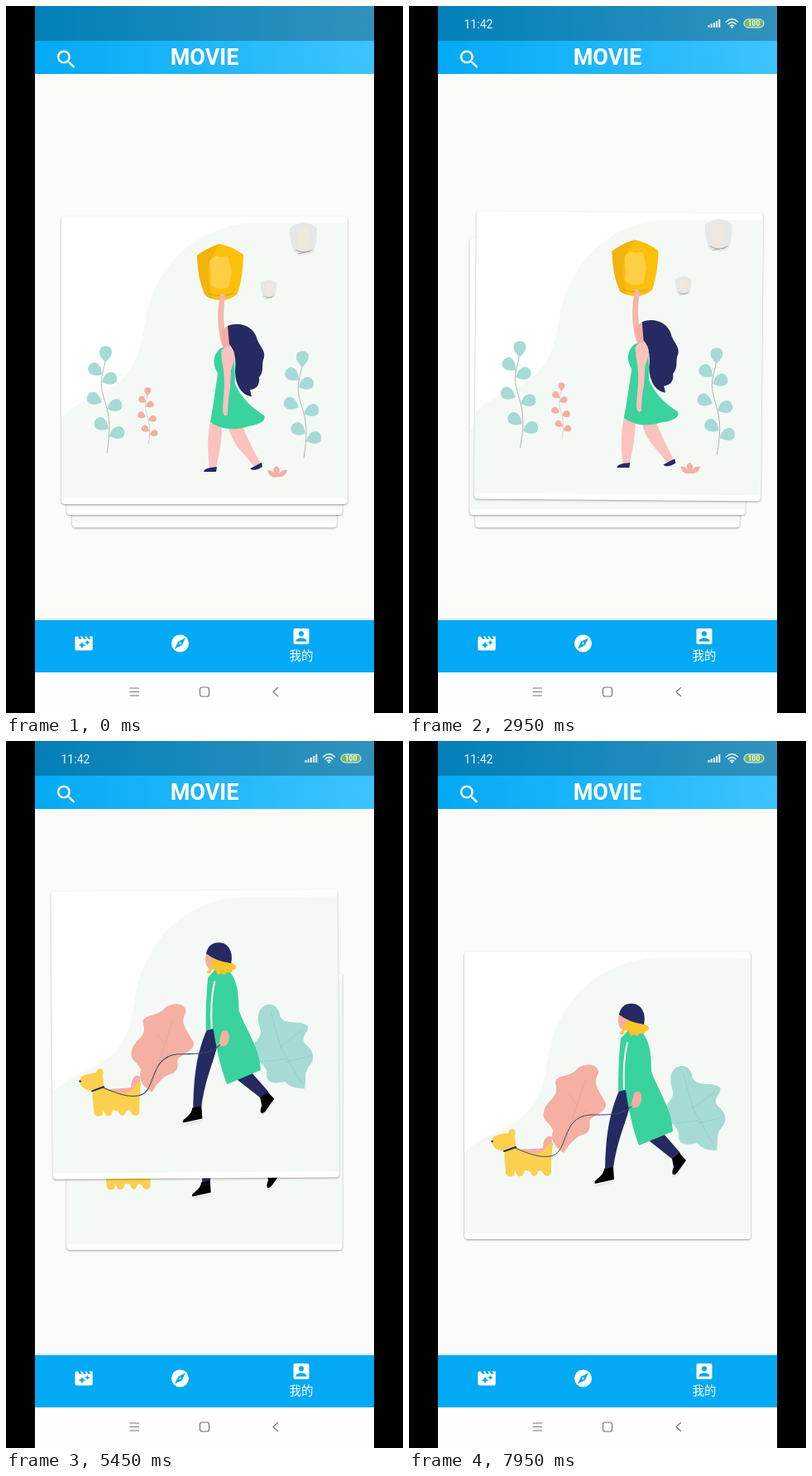
An HTML page that plays this animation: 480 by 853 pixels, repeating every 8000 ms.

```html
<!DOCTYPE html>
<html lang="zh">
<head>
<meta charset="utf-8">
<title>Card stack</title>
<style>
html, body { margin: 0; width: 100%; height: 100%; overflow: hidden; background: #000; }
svg { display: block; width: 480px; height: 853px; }
.paper { fill: #fff; filter: drop-shadow(0 1px 1.1px rgba(0, 0, 0, .38)); }
.teal { fill: #a5dbd4; }
.coral { fill: #f5afa3; }
.skin { fill: #fcc2bd; }
.navy { fill: #252a62; }
.green { fill: #3ad39d; }
.gold { fill: #fcc52a; }
.line { fill: none; stroke-linecap: round; stroke-linejoin: round; }
.white { fill: #fff; }
</style>
</head>
<body>
<svg viewBox="0 0 480 853">
<defs>
  <linearGradient id="statusFill"><stop stop-color="#0280b8"/><stop offset="1" stop-color="#3292be"/></linearGradient>
  <linearGradient id="barFill"><stop stop-color="#03a9f4"/><stop offset="1" stop-color="#3dc4ff"/></linearGradient>
  <clipPath id="content"><rect x="35" y="82" width="410" height="659"/></clipPath>

  <g id="paper">
    <rect class="paper" x="67" y="254" width="346" height="347" rx="4"/>
    <path fill="#f5f9f6" d="M413 262H297C228 265 181 315 169 375C165 400 162 424 146 444C124 471 86 474 67 497V594H413Z"/>
  </g>

  <path id="leaf" d="M0 0C-5 -4 -9 -9 -7 -15C-5 -20 4 -21 7 -15C9 -9 4 -4 0 0Z"/>
  <g id="sprig">
    <path class="line" stroke="#b5b5b5" stroke-width="1" d="M120 428C117 446 112 452 118 472C124 490 128 504 122 539"/>
    <use href="#leaf" transform="translate(120.500 429.500)"/>
    <use href="#leaf" transform="translate(116 445) rotate(-52)"/>
    <use href="#leaf" transform="translate(116 454) rotate(66)"/>
    <use href="#leaf" transform="translate(116 478) rotate(-66)"/>
    <use href="#leaf" transform="translate(122 486) rotate(68)"/>
    <use href="#leaf" transform="translate(124 510) rotate(-58)"/>
    <use href="#leaf" transform="translate(125 519) rotate(68)"/>
  </g>
  <g id="paleLantern">
    <path fill="#e4e8e9" d="M343 268Q351 262 360 261Q370 262 376 268Q376 285 372 297Q361 303 348 297Q343 283 343 268Z"/>
    <path fill="#efe8dc" d="M352 269Q360 264 368 270L366 293L353 293Z"/>
    <path class="line" stroke="#a99f9c" d="M350 294Q360 300 370 294M353 299L367 296"/>
  </g>

  <g id="lanternCard">
    <use href="#paper"/>
    <use href="#sprig" class="teal"/>
    <use href="#sprig" class="teal" transform="translate(238 6)"/>
    <use href="#sprig" class="coral" transform="translate(107.500 242.500) scale(.53)"/>
    <use href="#paleLantern"/>
    <use href="#paleLantern" transform="translate(104.200 175.500) scale(.593)"/>
    <path class="gold" style="fill:#fcc00b" d="M231 301Q243 292 258 287Q274 290 287 300Q287 325 280 347Q270 356 258 355Q247 354 241 349Q232 330 231 301Z"/>
    <path fill="#f0b40c" d="M231 301Q243 292 258 287L246 309Q243 330 249 353Q242 351 240 347Q232 330 231 301Z"/>
    <path fill="#fdcf45" d="M246 308Q252 299 260 303Q270 299 270 309L273 320L269 339Q257 345 247 336L248 326Z"/>
    <path class="line" stroke="#b8943c" stroke-width=".7" d="M245 347Q260 353 276 346"/>
    <path fill="#f4b5ad" d="M259 349Q262 343 265 350L264 358C262 376 264 390 268 409L263 414C257 398 255 380 257 361Z"/>
    <path fill="#f5aba0" d="M268 386Q261 390 261 397L263 410L271 412L275 390Z"/>
    <path class="navy" d="M268 386C283 380 299 387 303 400C305 409 314 415 312 424C308 433 313 440 306 448C307 456 304 462 295 463L297 471C285 470 277 457 277 440C279 425 275 414 270 408Z"/>
    <path class="skin" d="M247 502L261 504C261 530 257 542 254 558L246 558C243 532 244 515 247 502Z"/>
    <path class="skin" d="M269 508L286 506C292 523 301 538 307 551L300 556C289 540 274 531 269 508Z"/>
    <path class="green" d="M259 413C250 421 249 432 256 443C253 465 250 485 247 502C261 512 279 512 293 507C303 506 316 501 312 494C298 485 285 474 277 456L276 419L267 411Z"/>
    <path class="skin" d="M260 417Q266 407 274 414Q279 422 272 439L271 462Q268 475 268 493Q263 498 262 487L264 458Q264 440 261 428Z"/>
    <path class="navy" d="M239 562C240 557 248 557 255 556L254 562ZM295 558C300 556 305 552 309 551L310 556C304 560 298 561 295 558Z"/>
    <path class="coral" d="M328 568Q319 571 316 560Q323 560 325 565Q321 557 327 555Q333 558 330 565Q333 559 340 560Q337 570 328 568Z"/>
  </g>

  <g id="dogCard">
    <use href="#paper"/>
    <path class="coral" d="M205 394C217 387 230 391 229 401C222 412 227 418 237 435C243 445 225 451 219 457C217 463 222 468 213 474C201 477 194 486 187 497C175 488 171 482 174 470C171 460 160 458 163 448C165 432 183 432 177 413C176 402 195 407 205 394Z"/>
    <path class="teal" d="M323 394C334 388 342 396 343 407C350 418 365 410 376 418C379 425 366 431 373 440C386 451 384 460 376 469C371 476 374 484 372 494Q355 494 348 485C340 487 327 489 326 478C329 465 311 460 311 450C305 438 322 434 319 422C314 408 316 399 323 394Z"/>
    <path class="line" stroke="#c9aaa2" stroke-width=".6" d="M213 410L187 488M203 439L194 426M197 459L214 446"/>
    <path class="line" stroke="#91c4c2" stroke-width=".6" d="M332 402L343 443L368 487M343 443L370 423M350 461L377 455M349 458L323 461"/>
    <path fill="#e7ebe9" d="M222 535L249 530L247 534L228 538ZM318 526L336 507L325 524Z"/>
    <path class="navy" d="M255 420L266 420L267 440C262 462 252 480 247 515L237 516C238 488 239 455 255 420Z"/>
    <path class="navy" d="M290 482L308 474L328 497L319 505Z"/>
    <path d="M236 516L247 514L248 529L225 534C221 530 235 527 236 516ZM318 504L327 497L335 506L324 521C318 527 317 520 320 514Z"/>
    <path class="coral" d="M254 330Q251 341 256 347L265 350L267 332Z"/>
    <path class="green" d="M256 359L265 349L283 353C292 365 293 380 293 399C303 425 318 445 319 471L278 488C270 467 265 442 262 421L253 423C253 400 254 375 256 359Z"/>
    <path class="line" stroke="#fff" stroke-width="2" d="M264 364C260 380 259 400 260 420"/>
    <path class="gold" d="M263 333L284 341C291 344 292 349 286 350Q285 355 279 352Q277 358 272 354Q267 358 266 351L261 348L259 354L254 353Q261 347 263 333Z"/>
    <path class="navy" d="M254 330C256 319 264 316 271 317C282 318 287 330 284 342Q265 339 254 330Z"/>
    <path class="coral" d="M268 441L272 425C278 420 282 424 281 433C280 441 275 444 268 441Z"/>
    <path class="coral" d="M130 494C142 491 153 493 162 491C162 480 168 474 173 478L172 500L132 503Z"/>
    <path fill="#fad04e" d="M100 483C101 475 111 474 120 473Q121 468 125 468Q130 469 128 476L129 489C138 496 157 502 164 493Q169 484 174 485L172 506V521Q169 528 163 523L160 518L156 519Q154 527 149 524L146 519L140 518Q138 527 132 525L128 519L127 524Q120 528 117 522C117 510 114 504 116 495C107 494 101 491 100 483Z"/>
    <circle class="navy" cx="100.500" cy="483" r="1.200"/>
    <path class="line" stroke="#252a62" stroke-width="2" d="M115 495L129 490"/>
    <path class="line" stroke="#3b4a62" stroke-width="1" d="M128 491C145 498 158 503 170 501C194 499 182 454 219 451C242 451 258 452 270 440"/>
  </g>
</defs>

<rect width="480" height="853"/>
<rect x="35" y="82" width="410" height="660" fill="#fbfcfa"/>
<g clip-path="url(#content)" id="deck"></g>

<rect x="35" width="410" height="42" fill="url(#statusFill)"/>
<g id="status" class="white" opacity=".92">
  <text x="66.500" y="27" font-family="Roboto, sans-serif" font-size="14">11:42</text>
  <path d="M361.500 23h2v3h-2zM364.700 21.500h2v4.500h-2zM367.900 20h2v6h-2zM371.100 18h2v8h-2zM374.300 16h2v10h-2z"/>
  <path class="line" stroke="#fff" stroke-width="1.500" d="M383.500 19Q390.500 12.500 397.500 19M386 21.700Q390.500 17.500 395 21.700M388.300 24Q390.500 22 392.700 24"/>
  <circle cx="390.500" cy="25.500" r="1.200"/>
  <rect x="405" y="16" width="24" height="10" rx="5" fill="#7fbd5c" stroke="#fff"/>
  <text x="417" y="24.200" text-anchor="middle" font-family="Roboto, sans-serif" font-weight="700" font-size="8.500">100</text>
</g>

<rect x="35" y="42" width="410" height="40" fill="url(#barFill)"/>
<text class="white" x="240" y="71" text-anchor="middle" font-family="Roboto, sans-serif" font-weight="700" font-size="27">MOVIE</text>
<path class="white" transform="translate(58.300 49.800) scale(1.220)" d="M15.500 14h-.79l-.28-.27C15.410 12.590 16 11.110 16 9.500 16 5.910 13.090 3 9.500 3S3 5.910 3 9.500 5.910 16 9.500 16c1.610 0 3.090-.59 4.230-1.570l.27.28v.79l5 4.990L20.490 19l-4.990-5zm-6 0C7.010 14 5 11.990 5 9.500S7.010 5 9.500 5 14 7.010 14 9.500 11.990 14 9.500 14z"/>

<rect x="35" y="739" width="410" height="2" fill="#e4e8e8"/>
<rect x="35" y="741" width="410" height="63" fill="#03a9f4"/>
<g class="white">
  <path transform="translate(81.200 756.200) scale(1.070)" d="M18 4l2 3h-3l-2-3h-2l2 3h-3l-2-3H8l2 3H7L5 4H4c-1.100 0-2 .9-2 2v12c0 1.100.9 2 2 2h16c1.100 0 2-.9 2-2V4zM11.250 15.250L10 18l-1.250-2.750L6 14l2.750-1.250L10 10l1.250 2.750L14 14zM16.940 11.940L16 14l-.94-2.060L13 11l2.060-.94L16 8l.94 2.060L19 11z"/>
  <circle cx="210.500" cy="769" r="10.500"/>
  <path fill="#03a9f4" d="M204 775.500L208.200 766.700L217 762.500L212.800 771.300Z"/>
  <circle cx="210.500" cy="769" r="1.200"/>
  <rect x="347.500" y="751" width="19" height="19" rx="2"/>
  <path fill="#03a9f4" d="M350.700 766.700v-1C350.700 763.500 355 762.500 357 762.500S363.300 763.500 363.300 765.700v1z"/>
  <circle fill="#03a9f4" cx="357" cy="757.300" r="3.100"/>
  <text x="357" y="789" text-anchor="middle" font-family="'Noto Sans CJK SC', 'Noto Sans CJK', sans-serif" font-size="14.500">我的</text>
</g>

<rect x="35" y="804" width="410" height="49" fill="#fefefe"/>
<path class="line" stroke="#777" stroke-width="1.200" d="M150 823h10.500M150 827.500h10.500M150 832h10.500M328.500 822.500l-5.500 5 5.500 5"/>
<rect class="line" stroke="#777" stroke-width="1.200" x="234.500" y="822" width="11" height="11" rx="2.500"/>
</svg>
<script>
const LOOP = 8000, FLIGHT = 700, THROW = 320, TILT = 0.035;
const CARDS = ['lanternCard', 'lanternCard', 'dogCard', 'dogCard'];
const RELEASE = [1860, 3100, 7100];
const SLOTS = [[427.5, 1], [447, 0.963], [469, 0.924]]; // centre y, scale

// Finger paths of the thrown cards: time, x, y
const DRAGS = [
  [[250, 0, 0], [600, 60, -10], [1000, 80, -20], [1400, 30, -30], [1800, -67, -29], [1860, -88, -27]],
  [[2900, 0, 0], [2950, 13, -5], [3100, 88, -12]],
  [[3950, 0, 0], [4250, 45, -60], [4550, 10, -200], [4800, -24, -256], [5200, -20, -160],
   [5700, -5, 0], [6200, -17.5, 26], [6600, 15, 12], [6900, 30, 0], [7100, 88, -8]],
];

const deck = document.getElementById('deck');
const statusIcons = document.getElementById('status');
const nodes = CARDS.map(name => {
  const use = document.createElementNS('http://www.w3.org/2000/svg', 'use');
  use.setAttribute('href', '#' + name);
  deck.prepend(use);
  return use;
});

const clamp = v => Math.min(1, Math.max(0, v));
const easeOut = p => 1 - Math.pow(1 - p, 1.7);
const mix = (a, b, p) => a + (b - a) * p;

function slope(path, i, axis) {
  const a = path[i - 1], b = path[i + 1];
  return a && b ? (b[axis] - a[axis]) / (b[0] - a[0]) : 0;
}

// Cubic Hermite curve through the points of a path
function follow(path, t, axis) {
  const last = path.length - 1;
  if (t <= path[0][0]) return path[0][axis];
  if (t >= path[last][0]) return path[last][axis];
  const i = path.findIndex(point => point[0] > t) - 1;
  const a = path[i], b = path[i + 1], span = b[0] - a[0];
  const p = (t - a[0]) / span, q = 1 - p;
  return q * q * (1 + 2 * p) * a[axis] + p * p * (3 - 2 * p) * b[axis]
    + span * p * q * (q * slope(path, i, axis) - p * slope(path, i + 1, axis));
}

function placeCard(node, index, t) {
  const gone = RELEASE.filter(r => t >= r + FLIGHT).length;
  const shown = index >= gone && index < gone + SLOTS.length;
  node.style.display = shown ? '' : 'none';
  if (!shown) return;

  const flights = RELEASE.map(r => easeOut(clamp((t - r) / FLIGHT)));
  const depth = Math.max(0, index - flights.reduce((sum, f) => sum + f, 0));
  const low = Math.min(Math.floor(depth), SLOTS.length - 2);
  const [y, scale] = [0, 1].map(k => mix(SLOTS[low][k], SLOTS[low + 1][k], depth - low));

  let dx = 0, dy = 0, angle = 0;
  if (DRAGS[index] && index === gone) {
    dx = follow(DRAGS[index], t, 1);
    dy = follow(DRAGS[index], t, 2) * (1 - flights[index]);
    angle = dx * TILT;
    dx += Math.sign(dx) * THROW * flights[index];
  }
  node.setAttribute('transform',
    `translate(${240 + dx} ${y + dy}) rotate(${angle}) scale(${scale}) translate(-240 -427.5)`);
}

function draw() {
  const t = performance.now() % LOOP;
  nodes.forEach((node, i) => placeCard(node, i, t));
  statusIcons.style.display = t < 50 ? 'none' : '';
  requestAnimationFrame(draw);
}
draw();
</script>
</body>
</html>
```
